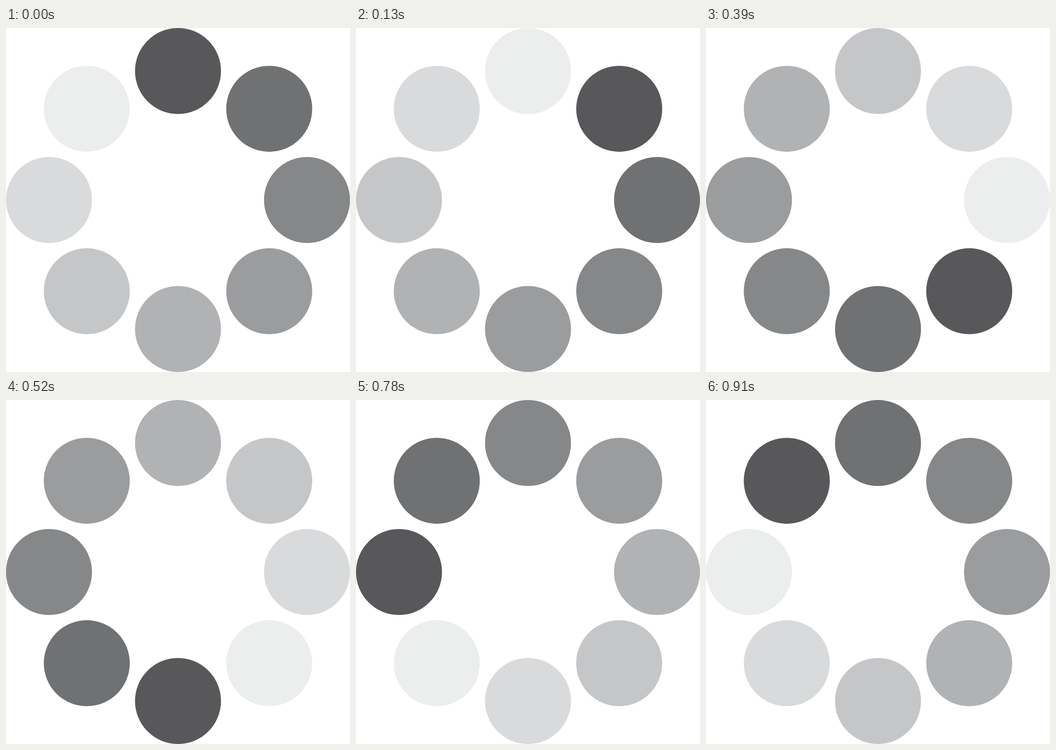
These frames come from a looping animation (748 by 748 pixels, 1.04 s). An HTML page:

```html
<!DOCTYPE html>
<html lang="en">
<head>
<meta charset="utf-8">
<title>Loading spinner</title>
<style>
  html, body { margin: 0; width: 100%; height: 100%; overflow: hidden; background: #fff; }
  svg { display: block; width: 100%; height: 100%; }
</style>
</head>
<body>
<svg id="stage" viewBox="0 0 748 748"></svg>
<script>
  const STEP = 130;
  const CENTER = 374, RING = 280.5, RADIUS = 93.5;
  // From the leading dot clockwise
  const SHADES = ['#58585a', '#707172', '#868788', '#9b9c9e', '#b1b2b4', '#c5c6c8', '#d9dadc', '#ebeeed'];
  const COUNT = SHADES.length;
  const stage = document.getElementById('stage');

  const dots = SHADES.map((_, i) => {
    const angle = i / COUNT * 2 * Math.PI;
    const dot = document.createElementNS('http://www.w3.org/2000/svg', 'circle');
    dot.setAttribute('cx', CENTER + RING * Math.sin(angle));
    dot.setAttribute('cy', CENTER - RING * Math.cos(angle));
    dot.setAttribute('r', RADIUS);
    return stage.appendChild(dot);
  });

  function render(ms) {
    const lead = Math.floor(ms / STEP) % COUNT;
    dots.forEach((dot, i) => dot.setAttribute('fill', SHADES[(i - lead + COUNT) % COUNT]));
  }

  let start;
  function tick(now) {
    start ??= now;
    render(Math.max(0, now - start));
    requestAnimationFrame(tick);
  }
  render(0);
  requestAnimationFrame(tick);
</script>
</body>
</html>
```
